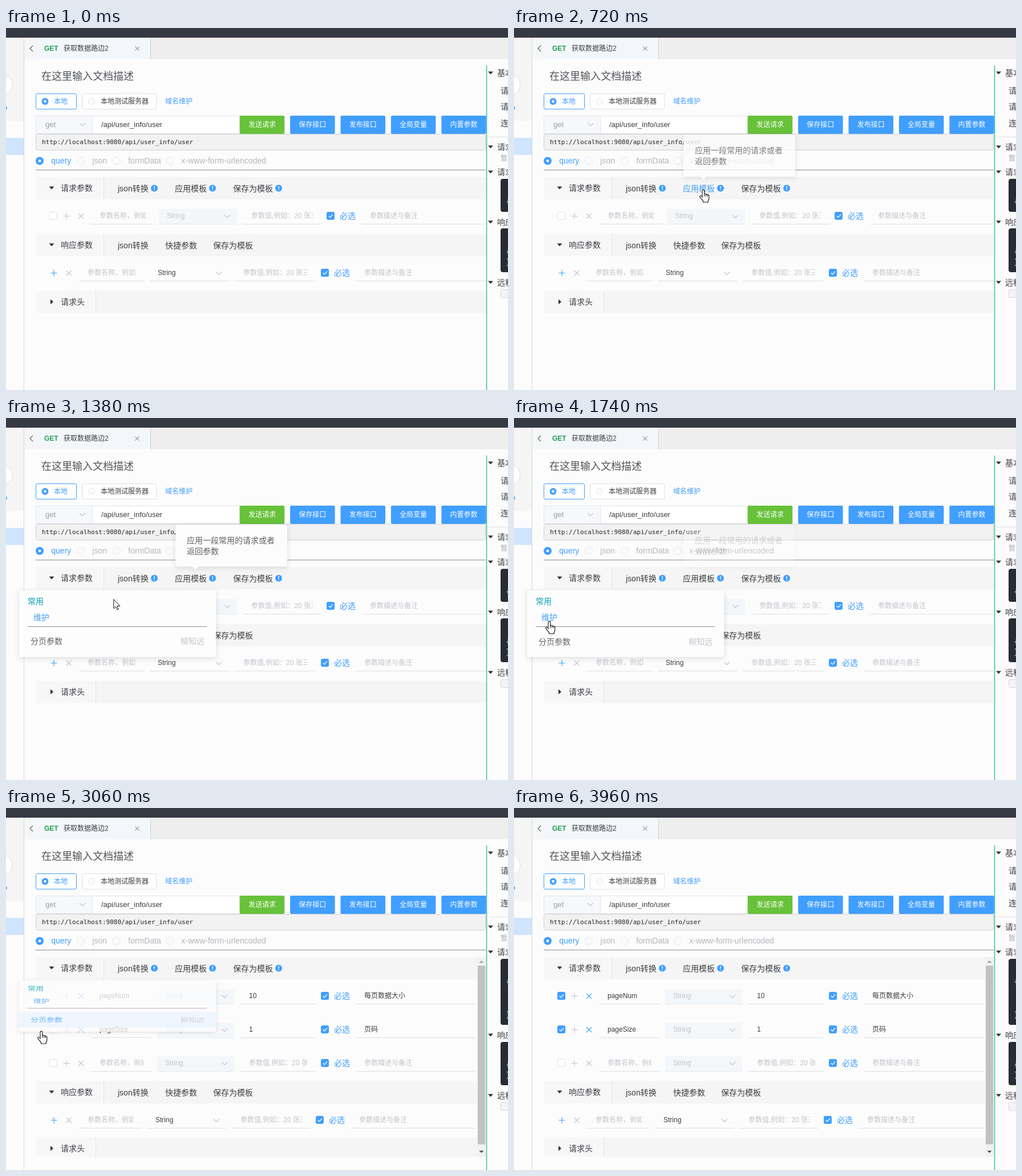
Write an HTML page that moves like this. It is 880 by 636 pixels and loops after 4860 ms.

```html
<!DOCTYPE html>
<html lang="zh-CN">
<head>
<meta charset="utf-8">
<style>
html, body { margin: 0; width: 100%; height: 100%; overflow: hidden; background: #fcfcfc; }
svg { display: block; }
text { font-family: "Liberation Sans", "Noto Sans CJK SC", "Noto Sans CJK", sans-serif; white-space: pre; }
.mono { font-family: "DejaVu Sans Mono", monospace; }
.card { filter: drop-shadow(0 2px 5px rgba(0, 0, 0, .13)); }
</style>
</head>
<body>
<script>
const BLUE = '#409eff', INK = '#3c3e42', TEXT = '#606266', FAINT = '#c0c4cc', EDGE = '#dcdfe6';
const LOOP = 4860, STEP = 30;

const text = (x, y, s, fill = INK, size = 14, more = '') =>
  `<text x="${x}" y="${y}" fill="${fill}" font-size="${size}" ${more}>${s}</text>`;
const box = (x0, y0, x1, y1, fill, stroke, r = 0) => {
  const h = stroke ? .5 : 0;
  return `<rect x="${x0 + h}" y="${y0 + h}" width="${x1 - x0 - 2 * h}" height="${y1 - y0 - 2 * h}" rx="${r}" fill="${fill}" stroke="${stroke || 'none'}"/>`;
};
const path = (d, stroke, width = 1, fill = 'none') =>
  `<path d="${d}" fill="${fill}" stroke="${stroke}" stroke-width="${width}"/>`;
const hline = (x0, x1, y, c = EDGE) => path(`M${x0} ${y + .5}H${x1}`, c);
const vline = (x, y0, y1, c = EDGE, w = 1) => path(`M${x + .5} ${y0}V${y1}`, c, w);
const dot = (x, y, r, fill, stroke = 'none') =>
  `<circle cx="${x}" cy="${y}" r="${r}" fill="${fill}" stroke="${stroke}"/>`;
const clipped = (x0, x1, y, s) =>
  `<svg x="${x0}" y="${y - 14}" width="${x1 - x0}" height="28">${s}</svg>`;

const radio = (x, y, r, on) => on ? dot(x, y, r, BLUE) + dot(x, y, 2.4, '#fff') : dot(x, y, r - .5, '#fafbfc', '#e6e8ed');
const chevron = (x, y) => path(`M${x - 5} ${y - 2.5}l5 5l5-5`, FAINT, 1.1);
const plus = (x, y, c) => path(`M${x - 5.5} ${y + .5}h11m-5.5-5.5v11`, c, 1.1);
const cross = (x, y, c, r = 4.5) => path(`M${x - r} ${y - r}l${2 * r} ${2 * r}m0-${2 * r}l-${2 * r} ${2 * r}`, c, 1.1);
const down = (x, y) => path(`M${x - 4.5} ${y - 2.5}h9l-4.5 5z`, 'none', 0, '#303133');
const info = (x, y) => dot(x, y, 6, BLUE) + path(`M${x} ${y - 3.5}v4.3m0 1.2v1.6`, '#fff', 1.5);
const square = (x, y, fill, stroke) => box(x, y - 7, x + 14, y + 7, fill, stroke, 2);
const checked = (x, y) => square(x, y, BLUE, BLUE) + path(`M${x + 3.6} ${y + .2}l2.7 2.7l4.6-5.4`, '#fff', 1.3);

function header(y, end, title, items = [], open = true, bottom = y + 39) {
  const cell = open ? 171 : 157;
  return box(53, y, end, bottom, '#f5f5f5') + box(53, y, cell, bottom, '#f7f7f8') + vline(cell, y, bottom, '#e3e4e7') +
    (open ? down(80, y + 19) : path(`M78 ${y + 14.5}l5 4.5l-5 4.5z`, 'none', 0, '#303133')) +
    text(96, y + 24, title) + items.map(([x, s, id]) => text(x, y + 25, s, INK, 14, id ? `class="${id}"` : '')).join('');
}

// One line of form fields; every column follows from the ends of the first three.
function fields(y, [n0, n1, s0, s1, v0, v1, end], { name, value, note, locked } = {}) {
  const base = y + 4, d0 = v1 + 72;
  const cell = (a, b, s, ph) => hline(a, b, y + 14) + clipped(a + 14, b - 14, y, text(1, 18, s || ph, s ? INK : FAINT, 12));
  return cell(n0, n1, name, '参数名称，例如') +
    (locked ? box(s0, y - 12, s1, y + 15, '#f4f7fa') : '') + hline(s0, s1, y + 14, locked ? '#e4e9f0' : EDGE) +
    text(s0 + 14, base, 'String', locked ? FAINT : INK, 12) + chevron(s1 - 17, y + 1) +
    cell(v0, v1, value, '参数值,例如：20 张三') +
    checked(v1 + 10, y) + text(v1 + 33, y + 5, '必选', BLUE) +
    hline(d0, end, y + 14) + text(d0 + 14, base, note || '参数描述与备注', note ? INK : FAINT, 12);
}
const request = (y, cols, data) => square(76, y, '#fff', EDGE) + (data ? `<g class="tick">${checked(76, y)}</g>` : '') +
  plus(106, y, FAINT) + cross(131.5, y + .5, data ? BLUE : FAINT) + fields(y, cols, { ...data, locked: true });
const response = (y, cols) => plus(84, y, BLUE) + cross(110, y + .5, FAINT) + fields(y, cols);

const requestItems = [[196, 'json转换'], [296, '应用模板', 'apply'], [398, '保存为模板']];
const responseItems = [[196, 'json转换'], [279, '快捷参数'], [363, '保存为模板']];
const requestHead = end => header(262, end, '请求参数', requestItems) + [260, 362, 478].map(x => info(x, 281.5)).join('');

const code = (y0, y1, marks) => box(867, y0, 890, y1, '#282c34', '', 4) +
  marks.map(([y, s]) => text(876, y, s, '#8fd0ea', 14, 'class="mono"')).join('');
const panelHead = (y, s) => down(849.5, y) + text(861, y + 5, s);
const panelEnd = (y, s) => panelHead(y, '响应数据') + code(...s) + panelHead(y + 106, '远程地址') +
  box(867, y + 118, 890, y + 133, '#f4f4f5', '#d4d6da', 3);

const before = requestHead(841) +
  request(330, [149, 260, 268, 405, 415, 552, 841]) +
  header(362, 841, '响应参数', responseItems) +
  response(430, [128, 242, 252, 390, 401, 542, 841]) +
  header(462, 841, '请求头', [], false) +
  code(265, 323, [[310, '{']]) + panelEnd(341, [352, 429, [[398, '{'], [416, '}']]]);

const cols = [149, 255, 265, 400, 411, 542, 824];
const after = requestHead(826) +
  request(330, cols, { name: 'pageNum', value: '10', note: '每页数据大小' }) +
  request(389, cols, { name: 'pageSize', value: '1', note: '页码' }) +
  request(448, cols) +
  header(480, 826, '响应参数', responseItems) +
  response(548, [128, 238, 248, 386, 396, 533, 824]) +
  header(579, 826, '请求头', [], false, 613) +
  box(826, 262, 841, 613, '#f1f1f1') + `<rect id="thumb" x="827" y="277" width="13" height="314"/>` +
  path('M829.5 272l4-4l4 4z', 'none', 0, '#a3a3a3') + path('M829.5 602l4 4l4-4z', 'none', 0, '#505050') +
  code(265, 381, [[310, '{'], [368, '}']]) + panelEnd(399, [411, 487, [[456, '{'], [474, '}']]]);

const buttons = ['发送请求', '保存接口', '发布接口', '全局变量', '内置参数'].map((s, i) => {
  const x = 409.7 + i * 88.4;
  return box(x, 154, x + 78.5, 186, i ? BLUE : '#67c23a', '', 2) + text(x + 39.2, 174, s, '#fff', 12, 'text-anchor="middle"');
}).join('');

const page = box(0, 0, 880, 636, '#fcfcfc') +
  box(0, 17, 31, 163, '#f5f5f5') + box(0, 193, 31, 223, '#cfe5fe') + dot(-7, 100, 18, '#fff', '#dcdcdc') +
  box(0, 138, 1.5, 143, BLUE) + box(32, 17, 880, 55, '#eeeeee') + box(32, 17, 57, 55, '#f5f6f7') +
  box(57, 17, 253, 55, '#f3f7fc') + vline(253, 17, 55, '#cfd2d8') + vline(31, 17, 636, '#d3d6db') +
  box(0, 0, 880, 17, '#363a43') +
  path('M47 31l-5 5l5 5', '#606266', 1.2) + text(67, 40, 'GET', '#27a155', 12, 'font-weight="bold"') +
  text(101, 40, '获取数据路边2', INK, 12) + cross(230, 36, '#a58d8d', 3.7) +
  text(62, 90.5, '在这里输入文档描述', '#505357', 18) +
  box(52, 115, 124, 143, '#fff', BLUE, 2) + radio(68.5, 129, 6, true) + text(84, 133, '本地', BLUE, 12) +
  box(133, 115, 264, 143, '#fff', EDGE, 2) + radio(150, 129, 6) + text(166, 133, '本地测试服务器', INK, 12) +
  text(279, 132.5, '域名维护', BLUE, 12) +
  box(52, 154, 152, 186, '#f6f8fb', '#e1e4ea', 2) + text(69, 174, 'get', '#9a9da3', 13) + chevron(134, 169.5) +
  box(151, 154, 410, 186, '#fff', '#e1e4ea') + text(167, 174, '/api/user_info/user', INK, 13) + buttons +
  box(52, 186, 841, 215, '#f2f2f3', '#cfd0d2', 3) +
  text(63, 204, 'http://localhost:9080/api/user_info/user', '#222', 11, 'class="mono"') +
  [[59, 'query'], [131, 'json'], [194, 'formData'], [287, 'x-www-form-urlencoded']].map(([x, s], i) =>
    radio(x, 233.5, 7, !i) + text(x + 20.3, 238, s, i ? '#b3b6bc' : BLUE)).join('') +
  hline(52, 841, 249, '#8b8d90') +
  panelHead(79, '基本信息') + text(867, 115, '请求') + text(867, 143, '请求') + text(867, 172, '连接') +
  hline(846, 880, 191) + panelHead(209, '请求头') + text(867, 233, '暂无', '#a6a9ad', 12) + panelHead(253, '请求数据');

const tip = path('M301 187h188a4 4 0 0 1 4 4v66a4 4 0 0 1-4 4H338l-6 6l-6-6H301a4 4 0 0 1-4-4v-66a4 4 0 0 1 4-4z', 'none', 0, '#fcfcfc') +
  text(317, 220, '应用一段常用的请求或者', TEXT) + text(317, 239, '返回参数', TEXT);
const menu = box(23, 303, 368, 420, '#fdfdfd', '', 4) +
  `<rect id="hover" x="23" y="375" width="345" height="35" fill="#ecf5ff"/>` +
  text(38, 327, '常用', '#0aa1b4') + text(48, 355, '维护', BLUE) + hline(38, 352, 366, '#8b8d90') +
  text(43, 397.5, '分页参数', TEXT, 14, 'id="item"') + text(306, 397.5, '柳知远', FAINT);
const hand = path('M5 13V2a1.9 1.9 0 0 1 3.8 0v5.5q2-.7 2.9.8 2-.7 2.8.9 2.3-.3 2.3 2V15q0 2.8-1.6 4.8V22H6.5v-2.2l-4.9-6q-1.8-2.3-.3-3.2 1.5-.7 3.7 2.4z', '#111', 1.1, '#fff') +
  path('M8.8 7.5V12m2.9-3.7V12m2.8-2.8v3', '#111');
const arrow = path('M6 .8V17l3.7-3.5l2.5 5.7l2.3-1l-2.5-5.6h5z', '#111', 1, '#fff');

document.body.innerHTML = `<svg width="880" height="636" viewBox="0 0 880 636">${page}
<g id="before">${before}</g><g id="after">${after}</g>${vline(842, 66, 636, '#3cc7a2', 1.6)}
<g id="tip" class="card">${tip}</g><g id="menu" class="card">${menu}</g>
<g id="cursor"><g id="hand">${hand}</g><g id="arrow">${arrow}</g></g></svg>`;

const el = id => document.getElementById(id);
const show = (id, on) => el(id).setAttribute('display', on ? 'inline' : 'none');
const setAll = (css, name, value) => document.querySelectorAll(css).forEach(e => e.setAttribute(name, value));
const clamp = v => Math.min(1, Math.max(0, v));

// Cursor keys: time, x, y
const track = [[90, 850, 56], [240, 592, 122], [390, 374, 232], [510, 331, 277], [600, 325, 284], [1140, 325, 284],
  [1410, 165, 322], [1650, 57, 354], [1740, 55, 357], [1830, 55, 360], [2160, 55, 392], [3330, 55, 392], [3570, 98, 403],
  [3720, 394, 414], [3840, 703, 390], [3900, 792, 358], [3960, 880, 240]];

function cursorAt(t) {
  const i = Math.max(1, track.findIndex(k => k[0] >= t));
  const [a, b] = [track[i - 1], track[i]], p = clamp((t - a[0]) / (b[0] - a[0]));
  return [a[1] + (b[1] - a[1]) * p, a[2] + (b[2] - a[2]) * p];
}

function menuSize(t) {
  if (t < 1140) return 0;
  return t < 3060 ? 1 - (1 - clamp((t - 1101) / 300)) ** 4 : (1 - clamp((t - 3041) / 300)) ** 4;
}

function draw(now) {
  const t = Math.floor(now % LOOP / STEP) * STEP;
  show('before', t < 3060);
  show('after', t >= 3060);
  setAll('.tick', 'opacity', clamp((t - 3060) / 150));

  const tipOn = Math.min(clamp((t - 600) / 150), clamp((1800 - t) / 240));
  show('tip', tipOn > 0);
  el('tip').setAttribute('opacity', tipOn);

  const size = menuSize(t);
  show('menu', size > 0);
  el('menu').setAttribute('opacity', size);
  el('menu').setAttribute('transform', `translate(0 ${303 * (1 - size)}) scale(1 ${size || .01})`);

  const moving = t >= 90 && t < 3960;
  show('cursor', moving);
  if (moving) {
    const [x, y] = cursorAt(t);
    el('cursor').setAttribute('transform', `translate(${x} ${y})`);
  }
  const pointing = t >= 480 && t < 1230 || t >= 1620 && t < 3300;
  show('hand', pointing);
  show('arrow', !pointing);

  setAll('.apply', 'fill', t >= 540 && t < 1230 ? BLUE : INK);
  const over = t >= 2010;
  show('hover', over);
  el('item').setAttribute('fill', over ? BLUE : TEXT);
  el('thumb').setAttribute('fill', t >= 3900 && t < 3960 ? '#a8a8a8' : '#c1c1c1');
  requestAnimationFrame(draw);
}
draw(performance.now());
</script>
</body>
</html>
```
